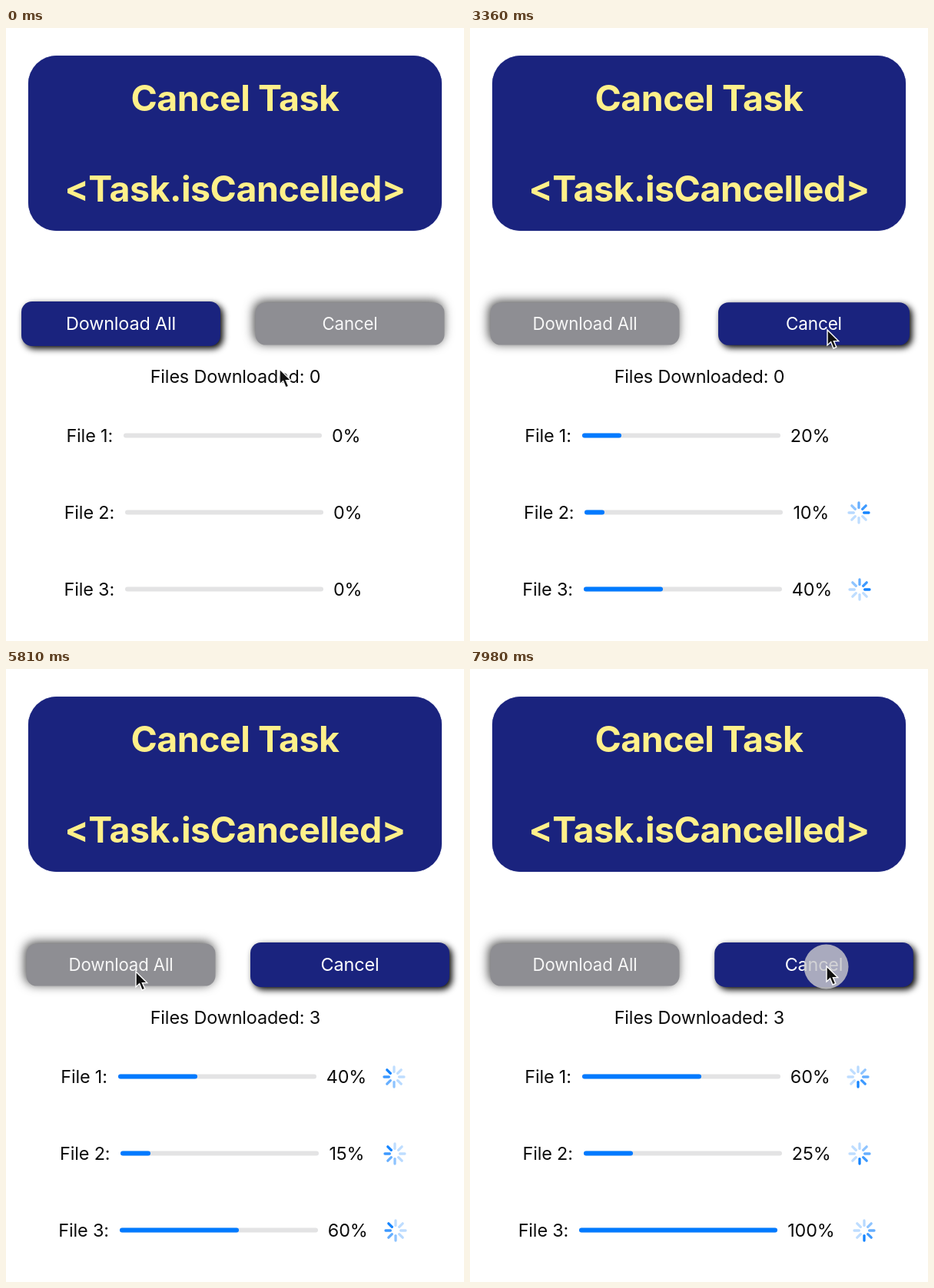
An HTML page that plays this animation: 596x798 px, repeating every 8 s.

```html
<!DOCTYPE html>
<html lang="en">
<head>
<meta charset="utf-8">
<title>Cancel Task</title>
<style>
html, body { margin: 0; width: 100%; height: 100%; overflow: hidden; background: #fff; }
body { position: relative; font: 23.4px/40px Inter, sans-serif; letter-spacing: -.15px; color: #0c0c0c; }
body > *, .row > * { position: absolute; white-space: nowrap; }
.panel { left: 29px; top: 36px; width: 538px; height: 228px; border-radius: 37px; background: #1a237e; box-shadow: 0 0 1px #1a237e; }
.title { left: 0; width: 596px; text-align: center; font-weight: 700; font-size: 46.5px; letter-spacing: -.5px; color: #fff08a; }
.btn { top: 356px; width: 259px; height: 58px; border-radius: 14px; line-height: 58px; text-align: center; }
#count { left: 187.7px; top: 434px; }
.row { left: 0; width: 596px; height: 40px; }
.label { right: 100%; margin-right: 14px; }
.track { top: 16px; width: 258px; height: 6px; border-radius: 3px; background: #e3e3e4; transform: translateY(.6px); }
.fill { height: 100%; border-radius: 3px; background: #007aff; }
.pct { left: 271px; }
.bar { left: 0; top: 0; width: 258px; height: 40px; }
.bar > * { position: absolute; }
svg { left: 0; top: 0; overflow: visible; }
.row svg { top: 20px; }
</style>
</head>
<body>
<div class="panel"></div>
<div class="title" style="top:71px">Cancel Task</div>
<div class="title" style="top:189px">&lt;Task.isCancelled&gt;</div>
<div class="btn" id="download" style="left:20px">Download All</div>
<div class="btn" id="cancel" style="left:318px">Cancel</div>
<div id="count"></div>
<svg id="pointer" width="1" height="1">
  <circle id="halo" cx="-.5" cy=".5" r="29" fill="#c8c8cc" opacity=".82"/>
  <path d="M0 0V20L4.6 15.8L8 24L11.8 22.4L8.4 14.6H14.6Z" fill="#111" stroke="#fff" stroke-width="1.4"/>
</svg>
<script>
const LOOP = 8000;
const START = [2030, 5560];      // Download All released
const STOP = 3300;               // Cancel released
const DONE = 4030;               // last task has noticed the cancellation
const PRESSES = {
  download: [[1860, START[0]], [5400, START[1]]],
  cancel: [[3130, STOP], [7960, 8130]]
};
// start, end, x, y: the pointer eases to x, y
const MOVES = [
  [0, 0, 356, 444], [140, 840, 155, 393], [2130, 2520, 484, 393],
  [2720, 3050, 465, 393], [4690, 5160, 169, 394], [6190, 6770, 464, 387]
];
const rows = [
  { y: 511, barX: 153, spinX: 498, step: 20, every: 1280 },
  { y: 611, barX: 155, spinX: 500, step: 5, every: 850 },
  { y: 711, barX: 155, spinX: 500, step: 20, every: 1000 }
];

const $ = id => document.getElementById(id);
const clamp = v => Math.max(0, Math.min(1, v));
const ease = v => (v = clamp(v), v * v * (3 - 2 * v));
const mix = (a, b, k) => a + (b - a) * k;

rows.forEach((row, i) => {
  const el = document.createElement('div');
  el.className = 'row';
  el.style.top = row.y + 'px';
  let spokes = '';
  for (let k = 0; k < 8; k++)
    spokes += `<path d="M0 -6.6V-13" transform="rotate(${k * 45})" stroke="#007aff" stroke-width="3.3" stroke-linecap="round"/>`;
  el.innerHTML = `<div class="bar"><span class="label">File ${i + 1}:</span>
    <div class="track"><div class="fill"></div></div><span class="pct"></span></div>
    <svg width="1" height="1">${spokes}</svg>`;
  document.body.insertBefore(el, $('pointer'));
  row.bar = el.querySelector('.bar');
  row.fill = el.querySelector('.fill');
  row.pct = el.querySelector('.pct');
  row.spin = el.querySelector('svg');
});

function drawButton(id, t, on) {
  let press = 0;
  for (const [down, up] of PRESSES[id])
    press = Math.max(press, ease((t - down) / 200) - ease((t - up) / 200));
  const s = $(id).style;
  const m = (a, b) => mix(a, b, on);
  s.transform = `scale(${1 - .05 * Math.max(press, 1 - on)})`;
  s.background = `rgb(${m(142, 26)},${m(142, 35)},${m(147, 126)})`;
  s.color = `rgba(255,255,255,${m(.93, 1)})`;
  s.boxShadow = `${m(-2, 3.5)}px ${m(-2, 3.5)}px ${m(14, 9)}px rgba(0,0,0,${m(.75, 1)})`;
}

function drawRow(row, t) {
  const { step, every } = row;
  const ticks = (start, until) => until < start ? 0 : Math.floor((until - start) / every) + 1;
  const stopped = START[0] + ticks(START[0], STOP) * every;
  const pct = Math.min(100, step * (ticks(START[0], Math.min(t, STOP)) + ticks(START[1], t)));
  const busy = t >= START[1] || (t >= START[0] && t < stopped);
  const text = String(pct);
  // the centred row shifts as the number gets wider
  const shift = text.length < 2 ? 0 : (text.length - 1) * 7.2 - (text[0] === '1' ? 1.6 : 0);
  row.bar.style.left = row.barX - shift + 'px';
  row.fill.style.width = pct + '%';
  row.pct.textContent = text + '%';
  row.spin.style.left = row.spinX + shift + 'px';
  row.spin.style.visibility = busy ? 'visible' : 'hidden';
  const head = Math.floor(t < START[1] ? (t - 2590) / 105 + 3.3 : (t - 6440) / 105 + 5.5);
  [...row.spin.children].forEach((spoke, k) => {
    const age = (((head - k) % 8) + 8) % 8;
    spoke.setAttribute('opacity', Math.max(.25, .92 - age * .16));
  });
}

function draw(t) {
  const swap = ease((t - START[0]) / 200) - ease((t - DONE) / 220) + ease((t - START[1]) / 200);
  drawButton('download', t, 1 - swap);
  drawButton('cancel', t, swap);
  $('count').textContent = 'Files Downloaded: ' + (t < DONE ? 0 : 3);
  rows.forEach(row => drawRow(row, t));

  let x = 0, y = 0;
  for (const [a, b, mx, my] of MOVES) {
    const k = b > a ? ease((t - a) / (b - a)) : 1;
    x = mix(x, mx, k);
    y = mix(y, my, k);
  }
  $('pointer').style.transform = `translate(${x}px,${y}px)`;
  const held = Object.values(PRESSES).flat().some(([down, up]) => t >= down && t < up);
  $('halo').style.visibility = held ? 'visible' : 'hidden';
}

const begin = performance.now();
function frame() {
  draw((performance.now() - begin) % LOOP);
  requestAnimationFrame(frame);
}
frame();
</script>
</body>
</html>
```
